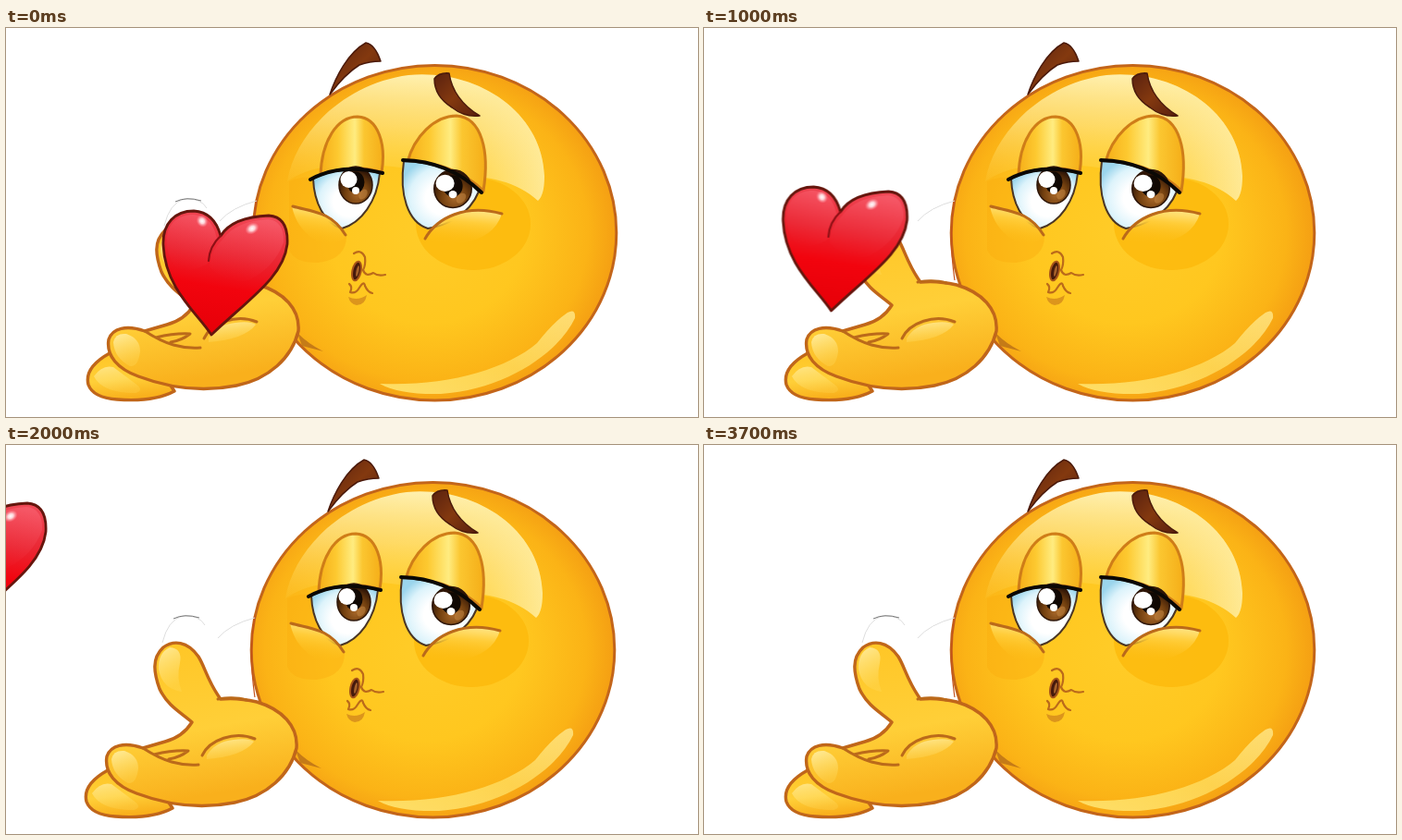
Recreate the animation shown at these times as an HTML page. Size 748 by 421 pixels, loop 4.5 s.

```html
<!DOCTYPE html>
<html lang="en">
<head>
<meta charset="utf-8">
<title>Blowing a kiss</title>
<style>
html, body { margin: 0; width: 100%; height: 100%; overflow: hidden; background: #fff; }
svg { display: block; width: 100%; height: 100%; }
.line { fill: none; stroke: #bb6a1a; stroke-width: 3; stroke-linecap: round; stroke-linejoin: round; }
.thin { stroke-width: 2.2; }
.skin { fill: url(#palm); stroke: #c0661a; stroke-width: 3.4; stroke-linejoin: round; }
.lash { fill: none; stroke: #0b0805; stroke-width: 4; stroke-linecap: round; }
.eye { fill: url(#eyeWhite); stroke: #4a3524; stroke-width: 2; }
.lid { fill: url(#lid); stroke: #cf7d18; stroke-width: 3; }
.brow { fill: url(#brow); stroke: #4b1a0b; stroke-width: 1.5; stroke-linejoin: round; }
#heart { animation: fly 4.5s step-end infinite; }
#body { animation: sway 4.5s step-end infinite; }
@keyframes fly {
  0% { transform: none; visibility: visible; }
  22.2222% { transform: translate(-84.5px, -26px); }
  33.3333% { transform: translate(-195px, -87.5px); }
  44.4444% { transform: translate(-261px, -140px); visibility: visible; }
  55.5556%, 100% { transform: translate(-261px, -140px); visibility: hidden; }
}
@keyframes sway {
  0% { transform: none; }
  33.3333% { transform: translate(-1.5px, -1px); }
  44.4444% { transform: translate(-2px, 0); }
  55.5556%, 100% { transform: none; }
}
</style>
</head>
<body>
<svg viewBox="0 0 748 421">
  <defs>
    <radialGradient id="face" cx=".48" cy=".5" r=".54">
      <stop offset="0" stop-color="#ffcc28"/>
      <stop offset=".5" stop-color="#ffc71f"/>
      <stop offset=".82" stop-color="#fbb316"/>
      <stop offset="1" stop-color="#f39a12"/>
    </radialGradient>
    <linearGradient id="shine" x1=".4" y1="0" x2=".3" y2="1">
      <stop offset="0" stop-color="#fff3b4" stop-opacity=".95"/>
      <stop offset=".4" stop-color="#ffe88c" stop-opacity=".65"/>
      <stop offset=".9" stop-color="#ffd850" stop-opacity=".1"/>
    </linearGradient>
    <linearGradient id="sideShine">
      <stop offset=".6" stop-color="#fff0a8" stop-opacity="0"/>
      <stop offset="1" stop-color="#fff0a8" stop-opacity=".85"/>
    </linearGradient>
    <linearGradient id="lowShine" x1="0" y1="1" x2="1" y2="0">
      <stop offset="0" stop-color="#ffe572" stop-opacity=".9"/>
      <stop offset=".5" stop-color="#ffdf62" stop-opacity=".75"/>
      <stop offset="1" stop-color="#ffe88c" stop-opacity=".8"/>
    </linearGradient>
    <linearGradient id="lid">
      <stop offset="0" stop-color="#f6ae18"/>
      <stop offset=".28" stop-color="#fdc930"/>
      <stop offset=".55" stop-color="#ffec80"/>
      <stop offset=".7" stop-color="#fbc630"/>
      <stop offset="1" stop-color="#f5ae18"/>
    </linearGradient>
    <radialGradient id="eyeWhite" cx=".55" cy=".55" r=".62">
      <stop offset=".4" stop-color="#fff"/>
      <stop offset=".75" stop-color="#dcf3fb"/>
      <stop offset="1" stop-color="#9bd5ec"/>
    </radialGradient>
    <radialGradient id="iris" cx=".55" cy=".75" r=".65">
      <stop offset="0" stop-color="#a8682a"/>
      <stop offset=".55" stop-color="#73400f"/>
      <stop offset="1" stop-color="#2e1506"/>
    </radialGradient>
    <linearGradient id="brow" x1="0" y1="0" x2="1" y2="1">
      <stop offset="0" stop-color="#5a210f"/>
      <stop offset=".5" stop-color="#83390f"/>
      <stop offset="1" stop-color="#591f0e"/>
    </linearGradient>
    <linearGradient id="cheek" x1=".6" y1="0" x2=".4" y2="1">
      <stop offset="0" stop-color="#ffe584"/>
      <stop offset=".35" stop-color="#ffcd3a"/>
      <stop offset="1" stop-color="#fdbc14" stop-opacity="0"/>
    </linearGradient>
    <linearGradient id="palm" x1="0" y1="0" x2=".2" y2="1">
      <stop offset="0" stop-color="#ffc524"/>
      <stop offset=".6" stop-color="#ffcf38"/>
      <stop offset="1" stop-color="#f9b01c"/>
    </linearGradient>
    <linearGradient id="gloss" x1="0" y1="0" x2=".3" y2="1">
      <stop offset="0" stop-color="#fff2b0"/>
      <stop offset="1" stop-color="#ffdc60" stop-opacity=".35"/>
    </linearGradient>
    <linearGradient id="red" x1=".58" y1="0" x2=".42" y2="1">
      <stop offset="0" stop-color="#f04a58"/>
      <stop offset=".35" stop-color="#ea2632"/>
      <stop offset=".62" stop-color="#f2040e"/>
      <stop offset="1" stop-color="#e60008"/>
    </linearGradient>
    <linearGradient id="pink" x1=".6" y1="0" x2=".3" y2="1">
      <stop offset="0" stop-color="#ff7080" stop-opacity=".4"/>
      <stop offset="1" stop-color="#f23a4a" stop-opacity="0"/>
    </linearGradient>
    <radialGradient id="spark">
      <stop offset="0" stop-color="#fff"/>
      <stop offset=".4" stop-color="#ffe3e6" stop-opacity=".9"/>
      <stop offset="1" stop-color="#ff9aa6" stop-opacity="0"/>
    </radialGradient>
    <clipPath id="ball"><ellipse cx="463.5" cy="221.7" rx="195" ry="180"/></clipPath>
    <path id="topShine" d="M304 166C313 112 367 60 435 51C512 44 580 93 582 160Q582 181 575 187C552 166 522 160 488 160C420 150 350 135 304 166Z"/>
    <g id="pupil">
      <ellipse rx="18" ry="20" fill="url(#iris)" stroke="#2e1608" stroke-width="1.5"/>
      <ellipse cx="0" cy="-3" rx="9.5" ry="11.5" fill="#100803"/>
      <ellipse cx="-7.5" cy="-6" rx="9" ry="9" fill="#fff"/>
      <circle cx="0" cy="6" r="4" fill="#fff"/>
      <ellipse cx="8" cy="10" rx="4" ry="6" fill="#c98b45" opacity=".5" transform="rotate(35 8 10)"/>
    </g>
  </defs>

  <g id="body">
    <!-- head -->
    <ellipse cx="463.5" cy="221.7" rx="196.3" ry="181.3" fill="url(#face)" stroke="#c3651a" stroke-width="3"/>
    <use href="#topShine" fill="url(#shine)"/>
    <use href="#topShine" fill="url(#sideShine)"/>
    <path d="M404 385C475 388 540 370 574 341Q592 318 607 308Q616 303 615 314C597 352 540 391 470 396Q425 397 404 385Z" fill="url(#lowShine)"/>
    <g clip-path="url(#ball)">
      <path d="M306 166Q318 160 334 162L368 225Q368 250 338 254Q312 255 306 240Z" fill="#fbb010" opacity=".5"/>
      <ellipse cx="505" cy="212" rx="62" ry="50" fill="#fdb90a" opacity=".75"/>
    </g>

    <!-- faded rim and smudges beside the head -->
    <path d="M271 185Q264 225 271 273" fill="none" stroke="#c4531d" stroke-width="1.2"/>
    <g fill="none" stroke="#ddd" stroke-width="1">
      <path d="M171 214Q177 189 193 185Q211 184 217 195"/>
      <path d="M231 209Q244 194 271 187"/>
      <path d="M183 188Q195 182 211 187" stroke="#777"/>
    </g>

    <!-- eyes -->
    <path class="lid" d="M340 160C341 122 358 96 380 96C403 97 411 127 406 156Q372 146 340 160Z"/>
    <path class="lid" d="M434 145C441 118 463 95 487 95C514 97 523 133 516 176Q482 144 434 145Z"/>
    <path class="eye" d="M332 163C333 189 344 211 363 217C384 211 401 188 404 157Q366 146 332 163Z"/>
    <path class="eye" d="M430 144C425 180 434 210 456 217C474 214 500 204 511 177Q480 145 430 144Z"/>
    <use href="#pupil" x="378" y="170"/>
    <use href="#pupil" transform="translate(483 174) scale(1.12 1.02)"/>
    <path class="lash" d="M329 164Q362 146 407 157"/>
    <path class="lash" d="M429 143Q479 144 514 178"/>

    <!-- cheeks -->
    <path d="M309 193C329 199 351 195 368 225Q355 240 332 228Q314 216 309 193Z" fill="url(#cheek)"/>
    <path class="line" d="M310 193C331 199 351 198 367 224"/>
    <path d="M452 229C465 205 495 188 536 201Q528 227 492 233Q462 238 452 229Z" fill="url(#cheek)"/>
    <path class="line" d="M453 228C466 205 497 190 536 201"/>

    <!-- lips -->
    <path d="M370 291Q380 296 390 289Q388 300 379 300Q372 299 370 291Z" fill="#dc951c"/>
    <ellipse cx="379" cy="263" rx="4.6" ry="10.5" transform="rotate(12 379 263)" fill="#45190c" stroke="#a75418" stroke-width="2"/>
    <ellipse cx="380" cy="263" rx="1.5" ry="6" transform="rotate(12 380 263)" fill="#a5602a"/>
    <path class="line thin" d="M376 244Q384 239 388 248Q389 256 386 262Q389 270 397 265Q402 269 410 267"/>
    <path class="line thin" d="M371 277Q375 280 372 286Q378 288 382 281Q387 273 388 279Q391 286 396 287"/>

    <!-- brows -->
    <path class="brow" d="M350 72C356 54 369 27 389 16Q399 18 405 36Q393 36 382 40Q366 50 350 72Z"/>
    <path class="brow" d="M463 55Q468 48 479 49C482 69 494 84 512 95Q496 97 482 86Q463 74 463 55Z"/>

    <!-- hand -->
    <path d="M315 330Q327 342 343 350L320 344Z" fill="#c57b17"/>
    <path class="skin" d="M112 352C94 362 86 374 89 386Q94 400 120 402Q160 405 182 393L160 360Z"/>
    <path d="M95 377Q104 364 116 367L140 385Q150 392 140 395Q104 395 95 377Z" fill="url(#gloss)" opacity=".7"/>
    <path class="skin" d="M234 275C220 256 217 240 210 229C198 212 183 211 172 219C159 231 162 247 168 264C177 283 192 290 203 300Q193 316 174 321L150 328C130 321 115 325 111 337C108 355 121 369 143 377C180 391 214 394 249 387C284 380 309 357 316 328C318 304 300 286 273 278Q252 273 234 275Z"/>
    <path d="M167 243Q166 225 179 219Q193 220 190 236Q186 252 192 267Q171 264 167 243Z" fill="url(#gloss)" opacity=".85"/>
    <path d="M116 340Q118 330 130 331Q145 336 145 350Q143 367 134 366Q117 357 116 340Z" fill="url(#gloss)" opacity=".85"/>
    <path d="M219 336Q228 321 248 319Q264 317 270 321Q258 337 219 340Z" fill="url(#gloss)" opacity=".8"/>
    <path class="line" d="M231 275Q249 272 262 276M150 328Q167 339 181 343Q195 347 210 346M162 335Q183 330 199 331M178 340Q190 338 199 331M214 336C222 319 249 309 271 318"/>
  </g>

  <g id="heart">
    <path d="M222 332C207 309 172 282 170 235C169 211 183 198 203 198C219 199 228 210 232 225C240 212 258 204 284 203C299 204 305 215 304 234C300 269 264 292 222 332Z" fill="url(#red)" stroke="#65160d" stroke-width="2.8" stroke-linejoin="round"/>
    <path d="M174 236C172 212 185 202 203 202C219 204 225 214 228 228Q217 242 218 255Q196 268 182 257Q175 246 174 236Z" fill="url(#pink)"/>
    <path d="M234 229C244 215 261 208 283 207C296 208 301 219 300 232Q290 260 260 274Q236 276 220 258Q221 241 234 229Z" fill="url(#pink)"/>
    <path d="M232 225Q220 236 219 252" fill="none" stroke="#8d0f15" stroke-width="2.2" stroke-linecap="round"/>
    <ellipse cx="212" cy="209" rx="6" ry="7" fill="url(#spark)" transform="rotate(-35 212 209)"/>
    <ellipse cx="266" cy="217" rx="8" ry="6" fill="url(#spark)" transform="rotate(-30 266 217)"/>
  </g>
</svg>
</body>
</html>
```
